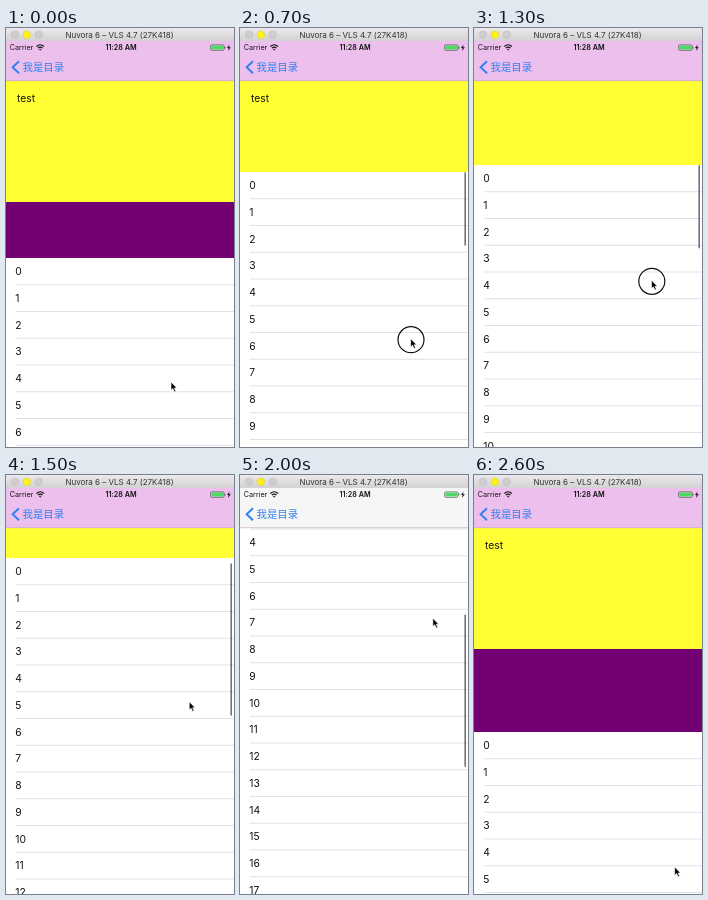
An HTML page that plays this animation: 228x419 px, repeating every 2.7 s.

```html
<!DOCTYPE html>
<html lang="en">
<head>
<meta charset="utf-8">
<title>List over header</title>
<style>
  html, body { margin: 0; width: 100%; height: 100%; overflow: hidden; background: #fff; }
  svg { display: block; width: 228px; height: 419px; font-family: Inter, Roboto, sans-serif; }
  .row { font-size: 10.3px; fill: #111; }
  .status { font-size: 7.2px; fill: #111; }
</style>
</head>
<body>
<svg viewBox="0 0 228 419">
  <defs>
    <linearGradient id="chrome" x2="0" y2="1">
      <stop stop-color="#ebe9eb"/><stop offset="1" stop-color="#d3d1d3"/>
    </linearGradient>
    <linearGradient id="blur" gradientUnits="userSpaceOnUse" x1="0" x2="0" y1="-20" y2="15">
      <stop stop-color="#ecbfec"/><stop offset="1" stop-color="#f7f6f7"/>
    </linearGradient>
  </defs>

  <rect width="228" height="419" fill="#730073"/>
  <rect y="53" width="228" height="121" fill="#ffff33"/>
  <text id="label" class="row" x="11" y="74">test</text>

  <g id="list">
    <rect width="228" height="720" fill="#fff"/>
  </g>
  <rect id="bar" x="224.4" width="1.6" rx=".8" fill="#000" fill-opacity=".55"/>

  <rect y="13" width="228" height="40" fill="url(#blur)"/>
  <path d="M0 52.7H228" stroke="#b9a9b9" stroke-width=".6"/>
  <path d="M13 33.2L6.6 39.2L13 45.2" fill="none" stroke="#2f80f0" stroke-width="1.9"/>
  <text x="16.5" y="43" font-size="10.4" fill="#2f80f0" style="font-family:'Noto Sans CJK SC','Noto Sans CJK',sans-serif">我是目录</text>

  <g class="status">
    <text x="3.8" y="22.2">Carrier</text>
    <text x="115" y="22.2" text-anchor="middle" font-weight="600">11:28 AM</text>
  </g>
  <g fill="none" stroke="#111" stroke-width="1.1">
    <path d="M30.4 18.5Q34.2 15.1 38 18.5M31.9 20.1Q34.2 18 36.5 20.1"/>
    <path d="M33.2 21.4L34.2 22.2L35.2 21.4Z" stroke-width=".5" fill="#111"/>
  </g>
  <rect x="204.6" y="16.8" width="13.4" height="5.6" rx="1.2" fill="none" stroke="#444" stroke-width=".6"/>
  <rect x="205.4" y="17.6" width="11.8" height="4" rx=".5" fill="#4cd964"/>
  <path d="M218.8 18.6V20.6" stroke="#444" stroke-width=".8"/>
  <path d="M223.6 16.4L221 20H222.7L222 23L224.8 19.2H223Z" fill="#111"/>

  <rect width="228" height="13" fill="url(#chrome)"/>
  <g stroke-width=".5">
    <circle cx="9" cy="6.8" r="3.8" fill="#cfcdcf" stroke="#bab8ba"/>
    <circle cx="20.8" cy="6.8" r="3.8" fill="#fff21a" stroke="#d8c830"/>
    <circle cx="32.8" cy="6.8" r="3.8" fill="#cfcdcf" stroke="#bab8ba"/>
  </g>
  <text x="113.5" y="10" text-anchor="middle" font-size="8" fill="#333">Nuvora 6 – VLS 4.7 (27K418)</text>

  <g id="pointer">
    <circle id="press" cx=".3" cy="1" r="13" fill="none" stroke="#111" stroke-width="1.2"/>
    <path d="M0 0V8.2L1.9 6.5L3.4 9.8L4.8 9.2L3.4 6H5.8Z" fill="#000" stroke="#fff" stroke-width=".6"/>
  </g>
</svg>
<script>
const LOOP = 2700, STEP = 100, ROW = 26.75;
const $ = id => document.getElementById(id);
const list = $('list'), bar = $('bar'), label = $('label');
const pointer = $('pointer'), press = $('press'), blur = $('blur');

// Keys are [ms, value]
const scroll = [[0, 230], [100, 200], [200, 178], [300, 174], [500, 174], [700, 144],
  [1300, 137], [1500, 83], [1700, 35], [1900, -30], [2100, -76], [2300, -98],
  [2400, 55], [2500, 225], [2600, 257]];
const lift = [[700, 0], [1300, 37], [2300, 37], [2400, 0]];
const px = [[0, 165], [400, 165], [700, 170.7], [1300, 177.5], [1700, 189], [2300, 196.7], [2600, 200.7]];
const py = [[0, 354], [400, 354], [700, 310.7], [1300, 252.3], [1700, 201], [2100, 124],
  [2300, 124], [2400, 215], [2500, 350], [2600, 392]];

function at(keys, t) {
  const i = keys.findIndex(k => k[0] >= t);
  if (i < 0) return keys[keys.length - 1][1];
  if (i === 0) return keys[0][1];
  const [t0, a] = keys[i - 1], [t1, b] = keys[i];
  return a + (b - a) * (t - t0) / (t1 - t0);
}

function add(parent, tag, attrs, text = '') {
  const el = document.createElementNS('http://www.w3.org/2000/svg', tag);
  for (const k in attrs) el.setAttribute(k, attrs[k]);
  el.textContent = text;
  parent.append(el);
}

for (let i = 0; i < 26; i++) {
  const y = i * ROW;
  add(list, 'text', { class: 'row', x: 9.3, y: y + 17.2 }, i);
  add(list, 'path', { d: `M10 ${y + ROW}H228`, stroke: '#d5d4d8', 'stroke-width': 0.7 });
}

function draw(t) {
  const y = at(scroll, t);
  list.setAttribute('transform', `translate(0 ${y})`);
  blur.setAttribute('gradientTransform', `translate(0 ${y})`);
  label.setAttribute('transform', `translate(0 ${-at(lift, t)})`);

  // The indicator is clipped by the top of the list
  const end = 272 - 0.376 * y, top = Math.max(end - 152.5, y);
  bar.setAttribute('y', top);
  bar.setAttribute('height', Math.max(0, end - top));

  pointer.setAttribute('transform', `translate(${at(px, t)} ${at(py, t)})`);
  const down = (t >= 500 && t <= 1400) || (t >= 2400 && t <= 2500);
  press.setAttribute('visibility', down ? 'visible' : 'hidden');
}

const start = performance.now();
function tick() {
  const t = (performance.now() - start) % LOOP;
  draw(Math.floor(t / STEP) * STEP);
  requestAnimationFrame(tick);
}
tick();
</script>
</body>
</html>
```
